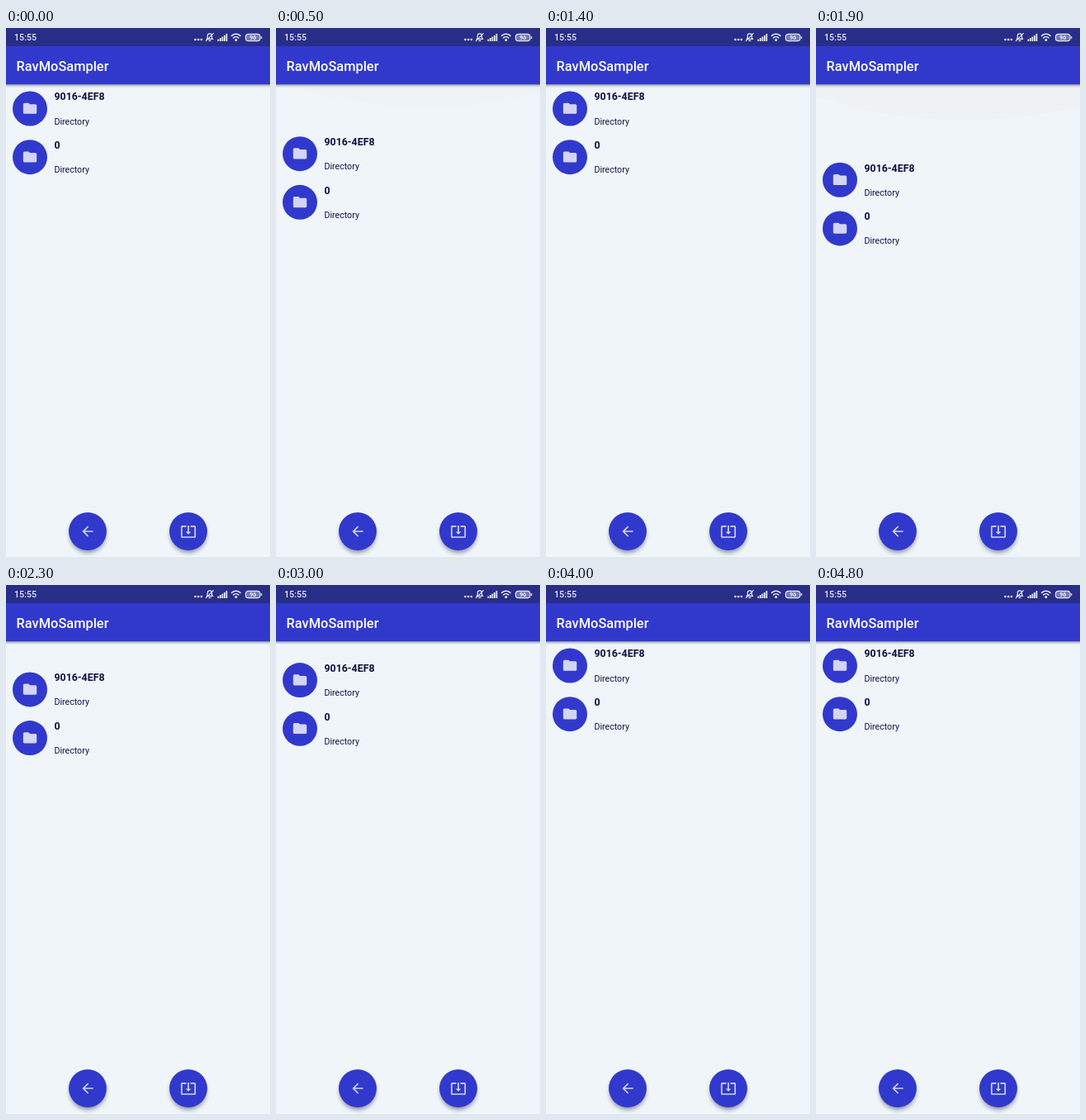
An HTML page that plays this animation: 320 px wide and 640 px high, repeating every 4.9 s.

```html
<!DOCTYPE html>
<html lang="en">
<head>
<meta charset="utf-8">
<title>File list</title>
<style>
  html, body { margin: 0; width: 100%; height: 100%; overflow: hidden; background: #eff5f9; }
  svg { display: block; width: 100%; height: 100%; font-family: Roboto, "Open Sans", sans-serif; }
  .name { font-size: 12.35px; font-weight: 700; fill: #10113f; }
  .kind { font-size: 10.67px; fill: #14154a; }
  .title { font-size: 16.4px; font-weight: 500; fill: #fff; }
  .clock { font-size: 10.7px; font-weight: 500; fill: #e6e8f5; }
  .level { font-size: 7px; font-weight: 700; fill: #eceef8; text-anchor: middle; }
  .disc { fill: #3139cd; }
  .icon { fill: #d2d5f5; }
  .line { fill: none; stroke: #e6e8f5; stroke-width: 1.2; stroke-linecap: round; }
  .wave { stroke-width: 1.6; }
</style>
</head>
<body>
<svg viewBox="0 0 320 640">
  <defs>
    <linearGradient id="shade" x2="0" y2="1">
      <stop offset="0" stop-color="#1a1f4a" stop-opacity=".55"/>
      <stop offset=".4" stop-color="#1a1f4a" stop-opacity=".18"/>
      <stop offset="1" stop-color="#1a1f4a" stop-opacity="0"/>
    </linearGradient>
    <filter id="soft" x="-40%" y="-40%" width="180%" height="180%">
      <feGaussianBlur stdDeviation="2.8"/>
    </filter>
    <clipPath id="page"><path d="M0 68h320v572H0z"/></clipPath>
    <g id="row">
      <circle class="disc" cx="29" cy="97.5" r="21"/>
      <path class="icon" transform="translate(19.2 87.4) scale(.82)"
        d="M10 4H4c-1.1 0-2 .9-2 2v12c0 1.1.9 2 2 2h16c1.1 0 2-.9 2-2V8c0-1.1-.9-2-2-2h-8z"/>
      <text class="kind" x="58.4" y="116.5">Directory</text>
    </g>
    <g id="fab">
      <circle cy="4" r="22" fill="#20244a" opacity=".45" filter="url(#soft)"/>
      <circle class="disc" r="23"/>
    </g>
  </defs>

  <path fill="#eff5f9" d="M0 0h320v640H0z"/>
  <g clip-path="url(#page)">
    <g id="list">
      <use href="#row"/>
      <text class="name" x="58.5" y="87.4">9016-4EF8</text>
      <use href="#row" y="58.7"/>
      <text class="name" x="58.5" y="146.1">0</text>
    </g>
    <circle id="glow" cx="180" r="578" fill="#e6e4e2"/>
  </g>

  <use href="#fab" x="99" y="609"/>
  <path class="icon" transform="translate(89.2 599.2) scale(.82)"
    d="M20 11H7.83l5.59-5.59L12 4l-8 8 8 8 1.41-1.41L7.83 13H20z"/>
  <use href="#fab" x="221" y="609"/>
  <path class="icon" transform="translate(211.2 599.2) scale(.82)"
    d="M12 16.5l4-4h-3v-9h-2v9H8zM21 3.5h-6v2h6v14H3v-14h6v-2H3c-1.1 0-2 .9-2 2v14c0 1.1.9 2 2 2h18c1.1 0 2-.9 2-2v-14c0-1.1-.9-2-2-2z"/>

  <path fill="url(#shade)" d="M0 68h320v4.5H0z"/>
  <path fill="#3139cd" d="M0 22h320v46H0z"/>
  <path fill="#282e87" d="M0 0h320v22H0z"/>
  <text class="title" x="12.6" y="52">RavMoSampler</text>

  <text class="clock" x="10" y="15.4">15:55</text>
  <g fill="#e6e8f5">
    <circle cx="229.5" cy="14" r="1.3"/>
    <circle cx="233.2" cy="14" r="1.3"/>
    <circle cx="236.9" cy="14" r="1.3"/>
    <path d="M256.5 13.5h1.8V16h-1.8zM259 12h1.8v4H259zM261.5 10.5h1.8V16h-1.8zM264 9h1.8v7H264zM266.5 7h1.8v9h-1.8z"/>
    <circle cx="278.8" cy="14.6" r="1.5"/>
  </g>
  <path class="line" d="M243.5 13.4h7l-1-1.5v-2.4a2.6 2.6 0 0 0-5.2 0v2.4zM246 15.4h2M242.3 15.6l9-9"/>
  <path class="line wave" d="M273.6 9.4a7.4 7.4 0 0 1 10.4 0M275.7 12a4.5 4.5 0 0 1 6.2 0"/>
  <rect class="line" style="fill:#7478b4" x="290.5" y="7.3" width="17.5" height="8.4" rx="3.2"/>
  <path class="line" d="M309.7 10.5v2"/>
  <text class="level" x="299.3" y="14.1">96</text>
</svg>
<script>
  const LOOP = 4900, STEP = 100;

  // Each pull drags the list down until peak, then lets it ease back.
  const pulls = [
    { from: 300, peak: 700, to: 1200, height: 90 },
    { from: 1500, peak: 2100, to: 2400, height: 115.5 },
    { from: 2600, peak: 2800, to: 3250, height: 30 }
  ];

  const list = document.getElementById("list");
  const glow = document.getElementById("glow");

  function pose(t) {
    const p = pulls.find(p => t >= p.from && t < p.to);
    if (!p) return { y: 0, light: 0 };
    if (t < p.peak) {
      const drag = ((t - p.from) / (p.peak - p.from)) ** 0.72;
      return { y: p.height * drag, light: drag * p.height / 115 };
    }
    const u = (t - p.peak) / (p.to - p.peak);
    return {
      y: p.height * (1 + Math.cos(Math.PI * u)) / 2,
      light: (1 - u) ** 8 * p.height / 115
    };
  }

  const start = performance.now();

  function draw(now) {
    const t = Math.floor(Math.max(0, now - start) % LOOP / STEP) * STEP;
    const { y, light } = pose(t);
    list.setAttribute("transform", `translate(0 ${y})`);
    glow.setAttribute("cy", 68 + 58 * light - 578);
    glow.setAttribute("opacity", 0.24 * light);
    requestAnimationFrame(draw);
  }
  draw(start);
</script>
</body>
</html>
```
